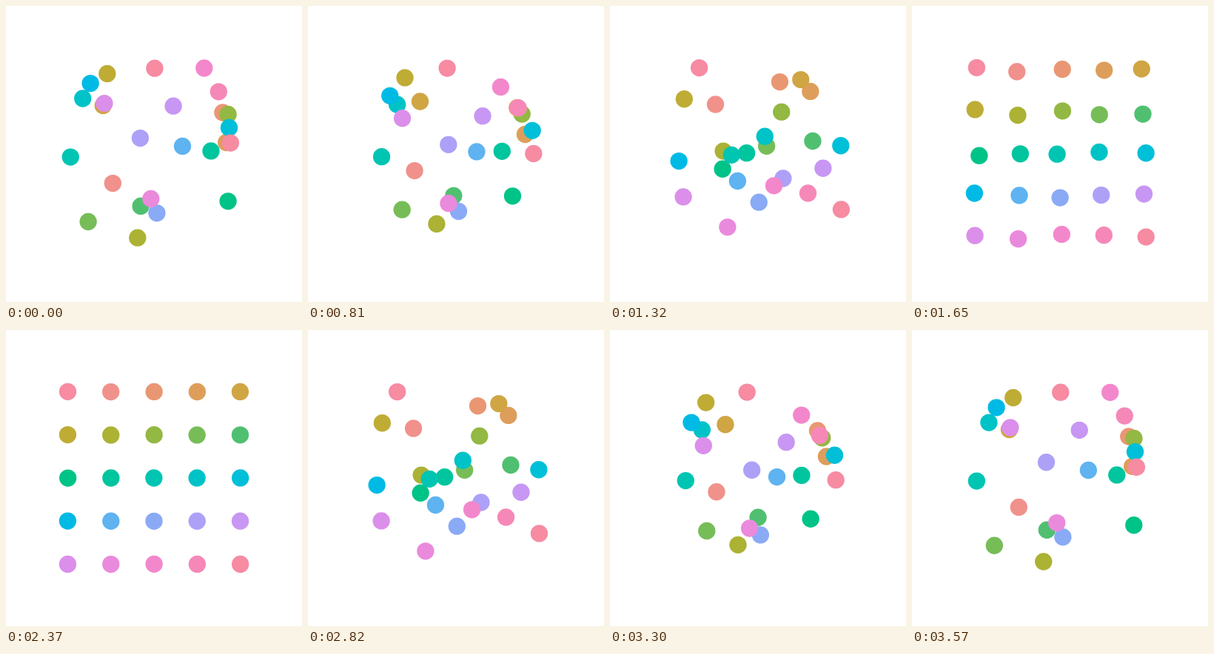
Recreate the animation shown at these times as an HTML page. Size 400x400 px, loop 3600 ms.

```html
<!DOCTYPE html>
<html lang="en">
<head>
<meta charset="utf-8">
<title>Dots</title>
<style>
  html, body { margin: 0; height: 100%; overflow: hidden; background: #fff; }
  svg { display: block; width: 100%; height: 100%; }
</style>
</head>
<body>
<svg viewBox="0 0 400 400"></svg>
<script>
const LOOP = 3600, HALF = LOOP / 2, HOLD = 540, STEP = 30;
const GAP = 175 / 3, RADIUS = GAP / 5;

const scattered = [
  [200.9, 84.2], [144.3, 239.6], [292.9, 144], [297.7, 184.5], [131.2, 134.6],
  [136.8, 91.4], [177.8, 313.2], [300.1, 146.5], [111.1, 291.5], [182.1, 270.4],
  [300.1, 263.8], [277, 195.9], [87.2, 204.1], [103.7, 125], [301.5, 164.5],
  [114.1, 104.6], [238.5, 189.4], [203.9, 279.8], [181.4, 178.6], [226.1, 135.2],
  [132.9, 131.6], [195.8, 260.5], [267.8, 84], [287.3, 115.8], [303.4, 185.1]
];

// Polar CIELUV to sRGB, clipped to the gamut
function hcl(hue, chroma, light) {
  const angle = hue * Math.PI / 180;
  const u = chroma * Math.cos(angle) / (13 * light) + 0.19784;
  const v = chroma * Math.sin(angle) / (13 * light) + 0.46834;
  const y = ((light + 16) / 116) ** 3;
  const x = y * 9 * u / (4 * v);
  const z = y * (12 - 3 * u - 20 * v) / (4 * v);
  const channels = [
    3.24048 * x - 1.53715 * y - 0.49854 * z,
    -0.96926 * x + 1.87599 * y + 0.04156 * z,
    0.05565 * x - 0.20404 * y + 1.05731 * z
  ].map(c => {
    const linear = Math.min(1, Math.max(0, c));
    const gamma = linear <= 0.0031308 ? 12.92 * linear : 1.055 * linear ** (1 / 2.4) - 0.055;
    return Math.round(255 * gamma);
  });
  return `rgb(${channels})`;
}

const svg = document.querySelector('svg');
const dots = scattered.map((from, i) => {
  const circle = document.createElementNS(svg.namespaceURI, 'circle');
  circle.setAttribute('r', RADIUS);
  circle.setAttribute('fill', hcl(i * 15, 70, 70));
  svg.append(circle);
  const to = [i % 5, Math.floor(i / 5)].map(n => 200 + (n - 2) * GAP);
  return { circle, from, to };
});

const mix = (a, b, p) => a + (b - a) * p;

function gridShare(time) {
  const progress = Math.max(0, (time % HALF - HOLD) / (HALF - HOLD));
  const eased = (1 - Math.cos(Math.PI * progress)) / 2;
  return time < HALF ? eased : 1 - eased;
}

function draw() {
  const time = Math.floor(performance.now() % LOOP / STEP) * STEP;
  const p = gridShare(time);
  for (const { circle, from, to } of dots) {
    circle.setAttribute('cx', mix(from[0], to[0], p));
    circle.setAttribute('cy', mix(from[1], to[1], p));
  }
  requestAnimationFrame(draw);
}
draw();
</script>
</body>
</html>
```
